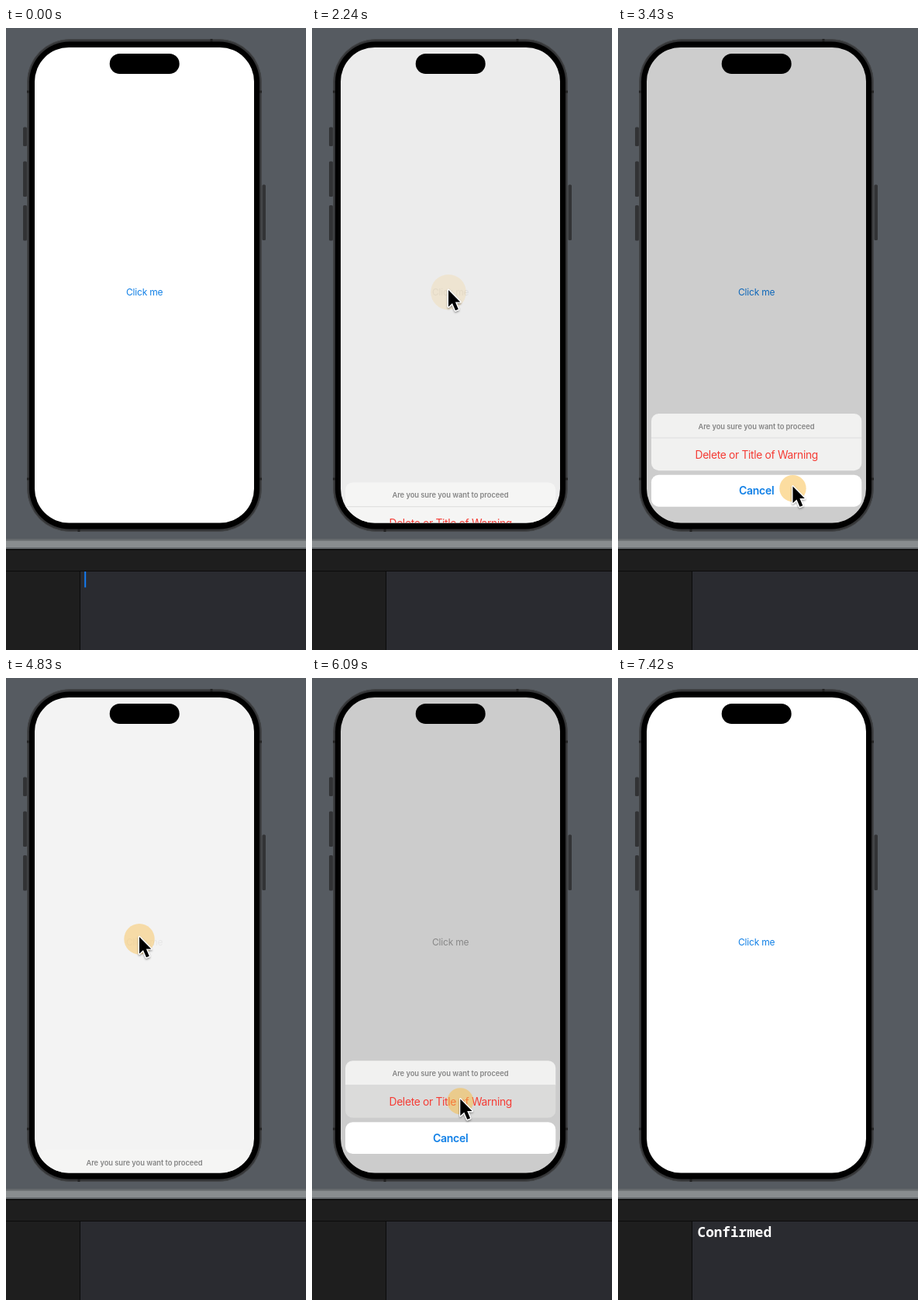
These frames come from a looping animation (387 by 800 pixels, 8050 ms). An HTML page:

```html
<!DOCTYPE html>
<html lang="en">
<head>
<meta charset="utf-8">
<title>Confirmation sheet</title>
<style>
  html, body { margin: 0; width: 100%; height: 100%; overflow: hidden; background: #565b61; }
  svg { display: block; }
  text { font-family: Inter, "Open Sans", sans-serif; text-anchor: middle; }
</style>
</head>
<body>
<svg width="387" height="800" viewBox="0 0 387 800">
  <defs>
    <clipPath id="screen"><rect x="37" y="25" width="283" height="611.5" rx="44"/></clipPath>
    <filter id="shadow" x="-50%" y="-50%" width="200%" height="200%">
      <feDropShadow dx="0" dy="1.5" stdDeviation="1.3" flood-opacity=".4"/>
    </filter>
  </defs>
  <rect width="387" height="800" fill="#565b61"/>

  <!-- phone body -->
  <g fill="#323335">
    <rect x="22" y="127.5" width="5" height="24.5" rx="1.5"/>
    <rect x="22" y="171.5" width="5" height="45.5" rx="1.5"/>
    <rect x="22" y="228" width="5" height="45.5" rx="1.5"/>
    <rect x="330.5" y="201.5" width="4.5" height="71.5" rx="1.5"/>
  </g>
  <rect x="27.5" y="14.5" width="302" height="633" rx="55" fill="#343537" stroke="#46484a"/>
  <path d="M27 82h4M326 82h4M27 580h4M326 580h4M265 14v4M94 644v4" stroke="#222" stroke-width="3"/>
  <rect x="30" y="17.5" width="297" height="627" rx="52"/>

  <g clip-path="url(#screen)">
    <rect x="37" y="25" width="283" height="612" fill="#fff"/>
    <text id="link" x="178.7" y="344.3" font-size="12" letter-spacing="-.2">Click me</text>
    <rect id="dim" x="37" y="25" width="283" height="612"/>
    <g id="sheet">
      <rect x="43" y="492.3" width="271.3" height="73.2" rx="9.5" fill="#f6f6f5" fill-opacity=".88"/>
      <path id="row" d="M43 523.8H314.3V556a9.5 9.5 0 0 1-9.5 9.5H52.5A9.5 9.5 0 0 1 43 556Z" fill="#000500" opacity=".09"/>
      <path d="M43 523.5H314.3" stroke="#d9d9d8" stroke-width=".8"/>
      <text x="178.5" y="512.2" font-size="9.36" font-weight="600" letter-spacing="-.05" fill="#868686">Are you sure you want to proceed</text>
      <text x="178.7" y="550" font-size="13.8" letter-spacing="-.31" fill="#f53b34">Delete or Title of Warning</text>
      <rect id="cancel" x="43" y="571.2" width="271.3" height="40.8" rx="9.5"/>
      <text x="178.7" y="596.8" font-size="14" font-weight="600" letter-spacing="-.3" fill="#0f7fe6">Cancel</text>
    </g>
  </g>
  <rect x="133.7" y="33" width="90" height="26" rx="13"/>

  <!-- console -->
  <rect y="657" width="387" height="14" fill="#666a6d"/>
  <rect y="659.5" width="387" height="8.5" fill="#898d8f"/>
  <rect y="670" width="387" height="130" fill="#0b0b0b"/>
  <rect y="671.5" width="387" height="26.5" fill="#1e1e1e"/>
  <rect y="699" width="95" height="101" fill="#1e1e1e"/>
  <rect x="96" y="699" width="291" height="101" fill="#2a2b30"/>
  <rect id="caret" x="101.2" y="699" width="2" height="20.5" fill="#147cf2"/>
  <text id="log" x="150.3" y="718.7" font-size="17.7" font-weight="600" fill="#fff"
    style="font-family:'Noto Sans Mono','DejaVu Sans Mono',monospace">Confirmed</text>

  <circle id="ring" fill="#f9bb41"/>
  <path id="arrow" d="M0 0V21.5L5 17L9 26.3L12.8 24.7L8.9 15.5H15.3Z" stroke="#fff" stroke-width="2.6"
    stroke-linejoin="round" paint-order="stroke" filter="url(#shadow)"/>
</svg>
<script>
const LOOP = 8050, STEP = 70;
const $ = id => document.getElementById(id);
const set = (id, attrs) => { for (const k in attrs) $(id).setAttribute(k, attrs[k]); };
const clamp = v => Math.max(0, Math.min(1, v));
const smooth = u => u * u * (3 - 2 * u);
const within = (t, a, b) => t >= a && t < b;

// pointer stops: time, x, y
const path = [
  [0, 362, 800], [840, 176, 340], [1190, 176, 340], [1470, 176, 337], [2470, 176, 337],
  [2900, 225.5, 589.5], [3500, 225.5, 589.5], [4030, 176, 338], [4270, 172, 334],
  [4480, 172, 333], [5210, 172, 333], [5460, 191, 557], [5530, 191.3, 541.5],
  [6580, 191.3, 541.5], [6650, 192.5, 543], [7140, 192.5, 543], [7420, 165, 812]
];
// button presses: down, up
const presses = [[1750, 2158], [3150, 3415], [4620, 4774], [5880, 6110]];

function pointer(t) {
  const i = path.findIndex(p => p[0] > t);
  if (i < 1) return path.at(-1).slice(1);
  const [a, b] = [path[i - 1], path[i]];
  const u = smooth((t - a[0]) / (b[0] - a[0]));
  return [1, 2].map(k => a[k] + (b[k] - a[k]) * u);
}

// critically damped spring from 0 to 1
function spring(ms) {
  const s = Math.max(0, ms) * 0.016;
  return s > 7 ? 1 : 1 - (1 + s) * Math.exp(-s);
}

function draw(t) {
  const [open1, close1, open2, close2] = presses.map(p => p[1]);
  const shown = spring(t - open1) - spring(t - close1) + spring(t - open2) - spring(t - close2);
  set('dim', { opacity: 0.2 * shown });
  set('sheet', {
    transform: `translate(0 ${148 * (1 - shown)})`,
    visibility: shown > 0.001 ? 'visible' : 'hidden'
  });
  set('row', { visibility: within(t, ...presses[3]) ? 'inherit' : 'hidden' });
  set('cancel', { fill: within(t, ...presses[1]) ? '#ebebeb' : '#fff' });

  let fade = 1;
  for (const [down, up] of [presses[0], presses[2]])
    if (within(t, down, up + 400)) fade = 0.15 + 0.85 * smooth(clamp((t - up - 50) / 350));
  const gray = within(t, open1, close1) || within(t, open2, close2);
  set('link', { fill: gray ? '#a8a8a8' : '#0f7fe6', opacity: fade });

  const [x, y] = pointer(t);
  set('arrow', {
    transform: `translate(${x} ${y})`,
    visibility: within(t, 70, 7420) ? 'visible' : 'hidden'
  });
  const press = presses.find(([down, up]) => within(t, down, up + 90));
  const u = press ? clamp((t - press[1]) / 90) : 1;
  set('ring', { cx: x, cy: y + 2.7, r: 17 + 7 * u * u, opacity: 0.5 * (1 - u ** 4) });

  const caretOn = t < 490 || within(t, 980, 1470) || within(t, 1960, 2170);
  set('caret', { opacity: caretOn ? 1 : 0 });
  set('log', { opacity: t >= 6790 ? 1 : 0 });
}

const start = performance.now();
function tick() {
  const t = (performance.now() - start) % LOOP;
  draw(Math.floor(t / STEP) * STEP);
  requestAnimationFrame(tick);
}
tick();
</script>
</body>
</html>
```
